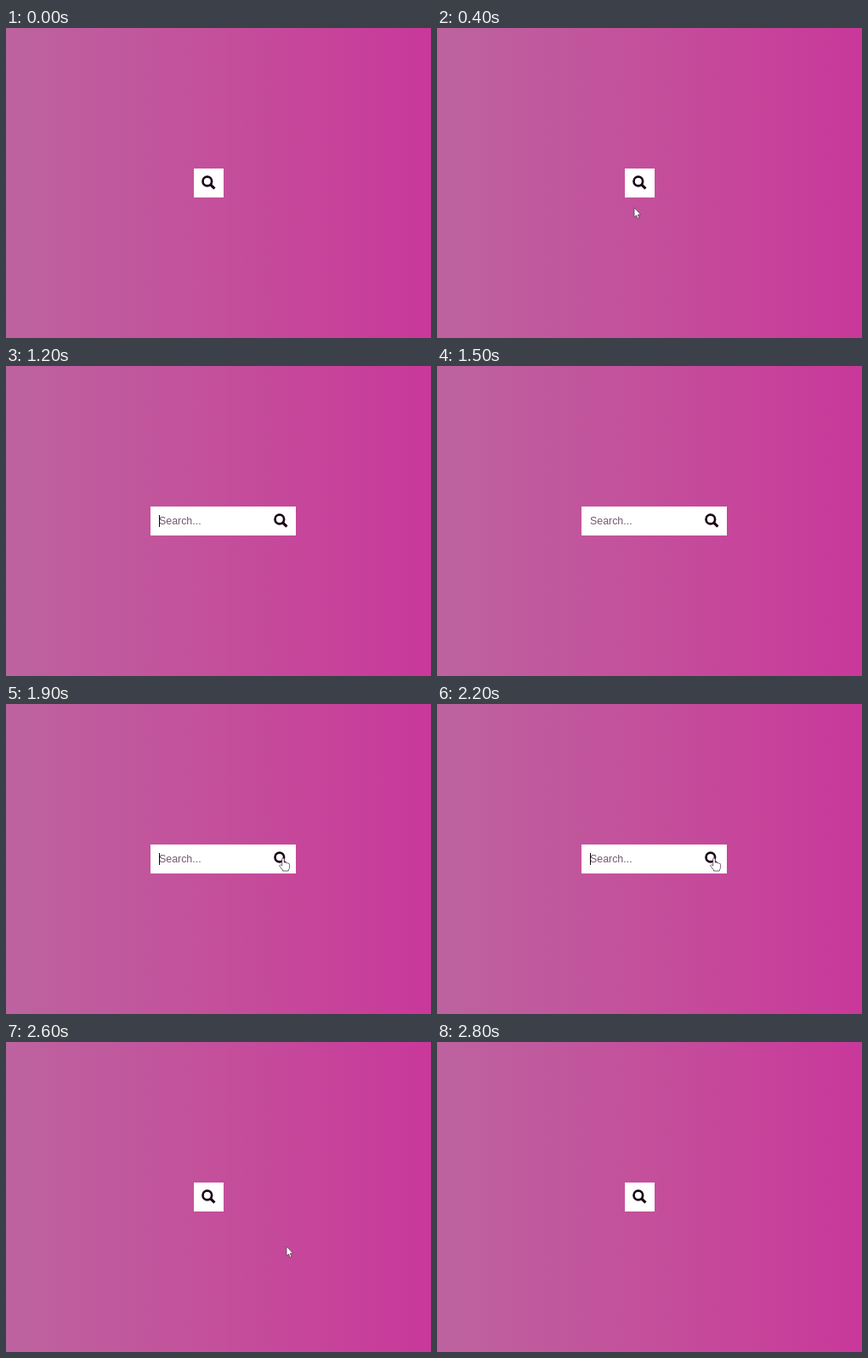
An HTML page for the animation above (3.3 s loop, 500 by 364 pixels).

```html
<!DOCTYPE html>
<html lang="en">
<head>
<meta charset="utf-8">
<title>Expanding search box</title>
<style>
  html, body { margin: 0; width: 100%; height: 100%; overflow: hidden; }
  body { background: linear-gradient(90deg, #bd639f, #c44f9b 50%, #c9389a); }
  #stage { display: block; width: 500px; height: 364px; }
  text { font: 12.4px "Liberation Sans", Arial, sans-serif; fill: #77586f; }
  .icon { fill: none; stroke: #1a0717; }
  .pointer { fill: #fff; stroke: #553a50; stroke-width: .8; stroke-linejoin: round; }
</style>
</head>
<body>
<svg id="stage" viewBox="0 0 500 364">
  <rect width="1" height="364" fill="#b0689b"/>

  <rect id="field" y="165" height="34" fill="#fff"/>
  <svg id="content" y="165" height="34">
    <text x="0" y="20.8">Search...</text>
    <rect id="caret" y="10" width="1" height="14" fill="#120510"/>
  </svg>

  <g id="button">
    <rect width="35" height="34" fill="#fff"/>
    <g class="icon">
      <circle cx="15.8" cy="15" r="5.3" stroke-width="2.7"/>
      <path d="M19.6 18.8 24.4 23.6" stroke-width="3.1"/>
    </g>
  </g>

  <path id="arrow" class="pointer" d="M0 0V11.2L2.5 8.9 4.2 12.9 6 12.1 4.3 8.2H7.7Z"/>
  <path id="hand" class="pointer" d="M-1.3 9V1.2a1.3 1.3 0 0 1 2.6 0V5.2q1.2-.9 2.2.4 1.3-.8 2.1.5 2-.3 2 1.6V10.5q0 2-1.3 3.2V15H-.6V13.7L-4 9.6q-.7-1.2.4-1.7 1-.3 2.3 1.1Z"/>
</svg>

<script>
const LOOP = 3300, STEP = 100, DURATION = 300;
const $ = id => document.getElementById(id);
const [field, content, caret, button, arrow, hand] =
  ["field", "content", "caret", "button", "arrow", "hand"].map($);

// start time, pointer shape, x, y
const pointerSteps = [
  [0, null],
  [100, arrow, 240, 345],
  [200, arrow, 237, 290],
  [300, arrow, 234, 243],
  [400, arrow, 232, 211],
  [500, hand, 231, 188],
  [600, hand, 231, 178],
  [1000, null],
  [1800, hand, 318, 180],
  [1900, hand, 326, 181],
  [2600, arrow, 330, 240],
  [2700, arrow, 336, 320],
  [2800, null]
];

// CSS "ease": cubic-bezier(.25, .1, .25, 1)
function ease(x) {
  if (x <= 0 || x >= 1) return x <= 0 ? 0 : 1;
  const bezier = (a, b, u) =>
    3 * a * u * (1 - u) ** 2 + 3 * b * u * u * (1 - u) + u ** 3;
  let low = 0, high = 1;
  for (let i = 0; i < 24; i++) {
    const mid = (low + high) / 2;
    if (bezier(.25, .25, mid) < x) low = mid; else high = mid;
  }
  return bezier(.1, 1, low);
}

const openness = (t, opens, closes) =>
  ease((t - opens) / DURATION) - ease((t - closes) / DURATION);

function drawBox(t) {
  const grow = openness(t, 863, 2213);
  const slide = openness(t, 847, 2213);
  const left = Math.round(221 - 51 * grow);
  const width = Math.round(35 + 102 * grow);
  field.setAttribute("x", left);
  field.setAttribute("width", width);
  content.setAttribute("x", left + 10);
  content.setAttribute("width", width - 20);
  button.setAttribute("transform", `translate(${Math.round(left + 136 * slide)} 165)`);
  const caretOn = t >= 900 && t < 1500 || t >= 1900 && t < 2700;
  caret.style.display = caretOn ? "" : "none";
}

function drawPointer(t) {
  const [, shape, x, y] = pointerSteps.findLast(step => step[0] <= t);
  for (const pointer of [arrow, hand])
    pointer.style.display = pointer === shape ? "" : "none";
  if (shape) shape.setAttribute("transform", `translate(${x} ${y})`);
}

const start = performance.now();
function render() {
  const elapsed = (performance.now() - start) % LOOP;
  const t = Math.floor(elapsed / STEP) * STEP;
  drawBox(t);
  drawPointer(t);
  requestAnimationFrame(render);
}
render();
</script>
</body>
</html>
```
